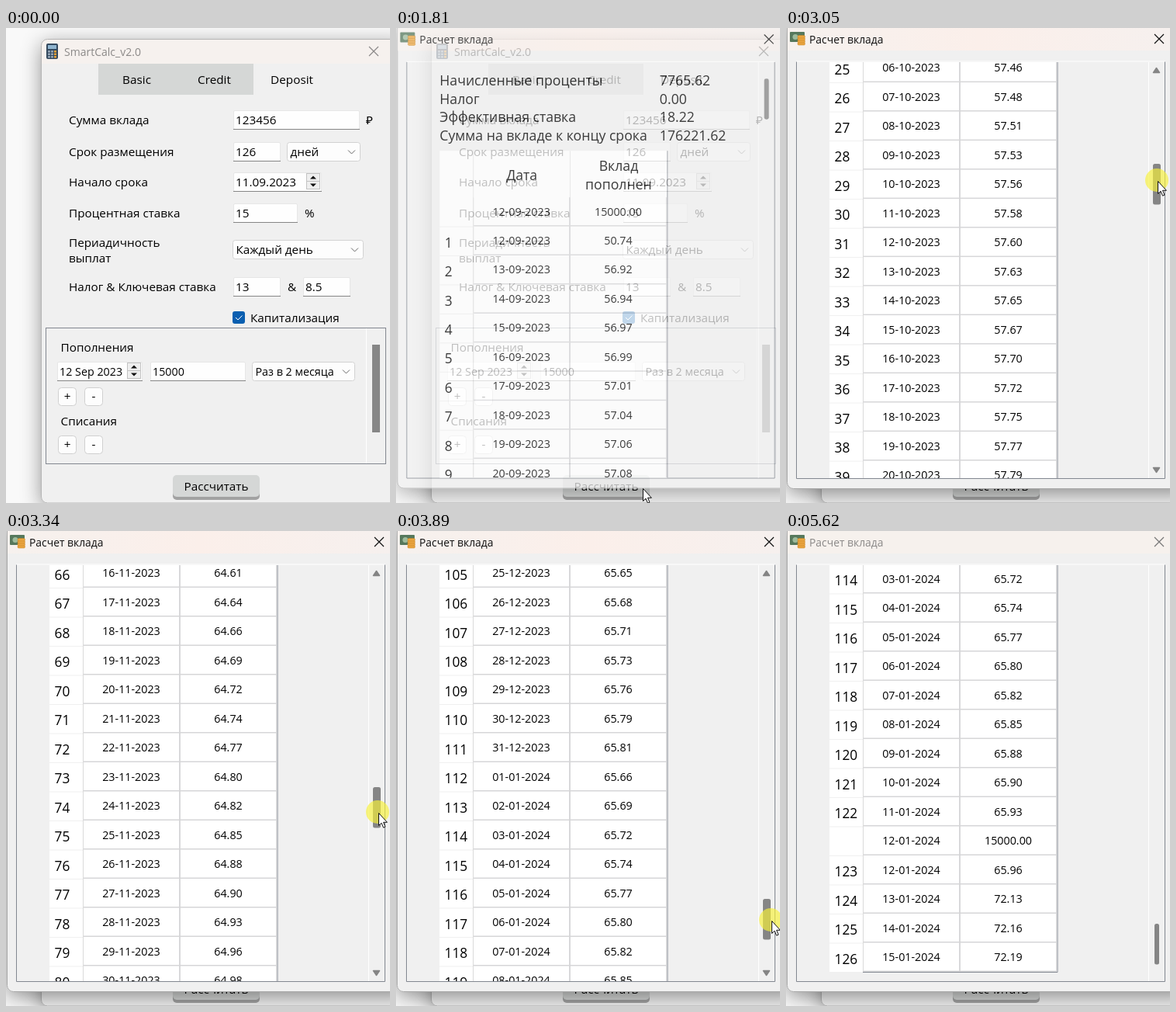
Recreate the animation shown at these times as an HTML page. Size 495x612 px, loop 5.69 s.

```html
<!DOCTYPE html>
<html lang="ru">
<head>
<meta charset="utf-8">
<title>SmartCalc</title>
<style>
html, body { margin: 0; width: 100%; height: 100%; overflow: hidden; background: #f9f9f9; }
svg { display: block; font-family: "Open Sans", "Noto Sans", sans-serif; font-size: 15.3px; }
text { white-space: pre; }
</style>
</head>
<body>
<svg id="stage" width="495" height="612" viewBox="0 0 495 612">
  <defs>
    <filter id="shadow" x="-20%" y="-20%" width="140%" height="140%">
      <feDropShadow dx="0" dy="6" stdDeviation="13" flood-color="#000" flood-opacity=".42"/>
    </filter>
    <linearGradient id="warm">
      <stop offset="0" stop-color="#f6f1ee"/><stop offset=".5" stop-color="#fbefea"/><stop offset="1" stop-color="#f6f0ee"/>
    </linearGradient>
    <linearGradient id="hover" x2="0" y2="1">
      <stop offset="0" stop-color="#9ab0cd"/><stop offset="1" stop-color="#dfe6ee"/>
    </linearGradient>
    <clipPath id="view"><rect x="14" y="44" width="453" height="536"/></clipPath>
  </defs>
</svg>
<script>
const LOOP = 5690, ROW = 37.5, SCROLL_MAX = 4487.5;
const stage = document.getElementById('stage');

function set(node, attrs) {
  for (const k in attrs) node.setAttribute(k, attrs[k]);
  return node;
}
function el(tag, attrs, parent) {
  return parent.appendChild(set(document.createElementNS('http://www.w3.org/2000/svg', tag), attrs));
}
const group = (parent, attrs = {}) => el('g', attrs, parent);
const rect = (p, x, y, width, height, fill, more = {}) => el('rect', { x, y, width, height, fill, ...more }, p);
const path = (p, d, more = {}) => el('path', { d, fill: 'none', ...more }, p);
function text(p, x, y, str, more = {}) {
  const t = el('text', { x, y, ...more }, p);
  t.textContent = str;
  return t;
}
const mid = { 'text-anchor': 'middle' };
const small = { 'font-size': 14.3 };

function box(p, x, y, w, h) {
  rect(p, x + .5, y + .5, w - 1, h - 1, '#fefefe', { rx: 1.5, stroke: '#e6e6e6' });
}
function field(p, x, y, w, str, more) {
  box(p, x, y, w, 25);
  rect(p, x, y + 24, w, 1, '#868686');
  text(p, x + 3, y + 18, str, more);
}
function combo(p, x, y, w, str, more) {
  rect(p, x + .5, y + .5, w - 1, 24, '#fdfdfd', { rx: 3, stroke: '#d2d2d2' });
  text(p, x + 4.5, y + 18, str, more);
  path(p, `M${x + w - 16} ${y + 10.5}l4.5 4.5 4.5-4.5`, { stroke: '#666' });
}
function spin(p, x, y, w, str, more) {
  field(p, x, y, w, str, more);
  const left = x + w - 19.5;
  for (const [dy, d] of [[1.5, 'l4-4 4 4z'], [11.5, 'l4 4 4-4z']]) {
    rect(p, left, y + dy, 17, 10, '#efefef', { stroke: '#c2c2c2' });
    path(p, `M${left + 4.5} ${y + dy + (dy < 5 ? 7 : 3)}${d}`, { fill: '#111' });
  }
}
function push(p, x, y, str) {
  rect(p, x + .5, y + .5, 23, 23, '#fdfdfd', { rx: 4, stroke: '#d0d0d0' });
  text(p, x + 12, y + 17, str, mid);
}
const cross = (p, x, y) => path(p, `M${x - 6} ${y - 6}l12 12m0-12l-12 12`, { stroke: '#111', 'stroke-width': 1.2 });

// Calculator window
const main = group(stage);
rect(main, 45.5, 14.5, 470, 597.5, '#f0f0f0', { rx: 8, filter: 'url(#shadow)' });
const mainBar = path(main, 'M45.5 46V22.5a8 8 0 0 1 8-8H500V46z');
rect(main, 45.5, 14.5, 470, 597.5, 'none', { rx: 8, stroke: '#b5b5b5' });
rect(main, 52, 20, 15, 20, '#34495e', { rx: 2 });
rect(main, 54, 22, 11, 5, '#8fb4cf');
for (let i = 0; i < 9; i++)
  rect(main, 54 + i % 3 * 4, 29 + (i / 3 | 0) * 3.5, 3, 2.5, i % 3 === 2 ? '#e9a23b' : '#93a4b5');
const mainTitle = text(main, 75, 36, 'SmartCalc_v2.0', { 'font-size': 14 });
const mainClose = cross(main, 474, 30);

rect(main, 119, 46, 200, 40, '#d5d7d6');
['Basic', 'Credit', 'Deposit'].forEach((s, i) => text(main, 168.5 + i * 100, 72, s, mid));

[[124, 'Сумма вклада'], [165, 'Срок размещения'], [204, 'Начало срока'], [244, 'Процентная ставка'],
 [282, 'Периадичность'], [302, 'выплат'], [339, 'Налог & Ключевая ставка']]
  .forEach(([y, s]) => text(main, 81, y, s));
field(main, 293, 106, 163, '123456');
text(main, 464, 124, '₽');
field(main, 293, 147, 61, '126');
combo(main, 362, 147, 95, 'дней');
spin(main, 293, 186, 114, '11.09.2023');
field(main, 293, 226, 83, '15');
text(main, 385, 244, '%');
combo(main, 292, 273, 169, 'Каждый день');
field(main, 293, 321, 61, '13');
text(main, 363, 339, '&');
field(main, 383, 321, 61, '8.5');
rect(main, 292, 365, 16, 16, '#0a5fb0', { rx: 3 });
path(main, 'M296 373l3 3 5.5-5.5', { stroke: '#fff' });
text(main, 315, 379, 'Капитализация');

rect(main, 51.5, 386.5, 438, 175, '#f0f0f0', { stroke: '#828790' });
rect(main, 464, 387, 1, 174, '#fff');
rect(main, 472, 408, 10, 113, '#868686');
text(main, 70.5, 417, 'Пополнения');
spin(main, 66, 430, 110, '12 Sep 2023', small);
field(main, 186, 430, 123, '15000', small);
combo(main, 317, 430, 133, 'Раз в 2 месяца', small);
text(main, 70.5, 512, 'Списания');
for (const y of [463, 525]) {
  push(main, 67, y, '+');
  push(main, 101, y, '-');
}
const calcEdge = rect(main, 215, 580, 112, 28, '', { rx: 5 });
const calcFace = rect(main, 215, 576, 112, 28, '', { rx: 5 });
text(main, 271, 596, 'Рассчитать', mid);

// Result window
const dialog = group(stage);
rect(dialog, 1.5, -10, 520, 603.5, '#f0f0f0', { rx: 8, stroke: '#a9a9a9', filter: 'url(#shadow)' });
const dialogBar = rect(dialog, 2, 0, 493, 29, '');
rect(dialog, 5, 5, 19, 13, '#56785c', { rx: 1 });
el('circle', { cx: 12, cy: 11.5, r: 3.5, fill: '#9dbb9c' }, dialog);
for (let i = 0; i < 4; i++)
  rect(dialog, 15, 18.5 - i * 3, 9.5, 3.5, '#e9a440', { rx: 1.5, stroke: '#c98422', 'stroke-width': .5 });
const dialogTitle = text(dialog, 30, 20, 'Расчет вклада', { 'font-size': 13.9 });
const dialogClose = cross(dialog, 481, 14);
path(dialog, 'M13.5 43V580.5H488.5V43', { stroke: '#828790' });
rect(dialog, 13, 42.5, 476, 1, '#fff');
rect(dialog, 467, 44, 1, 536, '#fff');

const sheet = group(group(dialog, { 'clip-path': 'url(#view)' }));
const big = { 'font-size': 17.7 };
[['Начисленные проценты', '7765.62'], ['Налог', '0.00'], ['Эффективная ставка', '18.22'],
 ['Сумма на вкладе к концу срока', '176221.62']].forEach(([name, value], i) => {
  const y = 74 + i * 23.6;
  text(sheet, 56, y, name, big);
  text(sheet, 340, y, value, big);
});
const tableEnd = 218 + 129 * ROW;
rect(sheet, 56, 158, 294, tableEnd - 158, '#fff');
text(sheet, 162, 196, 'Дата', { ...mid, ...big });
text(sheet, 287, 184, 'Вклад', { ...mid, ...big });
text(sheet, 287, 208, 'пополнен', { ...mid, ...big });
rect(sheet, 99, 158, 1, 60, '#e6e6e6');
rect(sheet, 224, 158, 1, 60, '#e6e6e6');
rect(sheet, 99, 218, 1, tableEnd - 218, '#dadada');
rect(sheet, 223, 218, 2, tableEnd - 218, '#d8d8da');
rect(sheet, 348, 218, 1, tableEnd - 218, '#dadada');
path(sheet, `M350 158V${tableEnd + .5}H56`, { stroke: '#868b94' });

let line = 0;
function addRow(num, date, value) {
  const y = 236.5 + line++ * ROW;
  rect(sheet, 100, y + 17.5, 249, 1.5, '#d6d6d8');
  rect(sheet, 56, y + 19, 43, 1, '#f0f0f0');
  text(sheet, 62.5, y + 8.7, num, { 'font-size': 17.3 });
  text(sheet, 161.5, y + 5, date, { ...mid, ...small });
  text(sheet, 286.5, y + 5, value.toFixed(2), { ...mid, ...small });
}
// Daily capitalisation at 15 %, topped up on the 12th of every second month
let sum = 123456;
for (let n = 1; n <= 126; n++) {
  const day = new Date(Date.UTC(2023, 8, 11 + n));
  const date = day.toISOString().slice(0, 10).split('-').reverse().join('-');
  const gain = sum * .15 / (day.getUTCFullYear() === 2024 ? 366 : 365);
  sum += gain;
  if (day.getUTCDate() === 12 && day.getUTCMonth() % 2 === 0) {
    addRow('', date, 15000);
    sum += 15000;
  }
  addRow(n, date, gain);
}

const arrows = group(dialog);
for (const d of ['M473.5 57.5l4-6 4 6z', 'M473.5 566.5l4 6 4-6z'])
  path(arrows, d, { fill: '#858585', stroke: '#858585', 'stroke-width': 1.5, 'stroke-linejoin': 'round' });
const thumb = rect(dialog, 473, 65, 10, 52.5, '#858585', { rx: 2.5 });

// Pointer
const pointer = group(stage);
const halo = el('circle', { cx: -1, cy: -1, r: 15, fill: '#f8f13a', 'fill-opacity': .66 }, pointer);
path(pointer, 'M.5 .5V16.5L4 13.2L6.6 19.2L9 18.1L6.5 12.3H11.4Z', { fill: '#fff', stroke: '#111' });

const starts = [0, 1550, 1600, 2150, 2780, 3410, 3890, 4030, 4660];
const way = [[0, 268, 640], [70, 268, 622], [550, 264, 592], [1670, 264, 592], [2080, 423, 594], [2150, 430, 575],
  [2500, 470, 240], [2710, 478, 94], [2780, 478, 98], [3340, 480, 363], [3890, 484, 502], [3960, 484, 514],
  [4240, 483, 540], [4450, 482, 557], [4590, 482, 575], [4990, 478, 640]];
const drag = [[2740, 0], [3340, 2695], [3890, 4157.5], [3960, 4280], [4240, SCROLL_MAX]];

// Linear value of one column of a time-sorted key list
function at(keys, t, col = 1) {
  const i = keys.findIndex(k => k[0] > t);
  if (i < 0) return keys[keys.length - 1][col];
  if (i === 0) return keys[0][col];
  const a = keys[i - 1], b = keys[i];
  return a[col] + (b[col] - a[col]) * (t - a[0]) / (b[0] - a[0]);
}
function stepped(t) {
  const s = starts.filter(v => v <= t).pop();
  return s + Math.floor((t - s) / 70) * 70;
}

function draw(now) {
  const real = now % LOOP, t = stepped(real);
  const x = Math.round(at(way, t, 1)), y = Math.round(at(way, t, 2));
  const active = real >= 70, open = at([[1600, 0], [1880, 1]], t);

  set(mainBar, { fill: active ? '#f3f3f1' : '#f6f1ee' });
  set(mainTitle, { fill: active ? '#111' : '#8b8988' });
  set(mainClose, { stroke: active ? '#111' : '#8b8988' });
  const hot = y < 608 && t < 1740;
  set(calcFace, { fill: hot ? 'url(#hover)' : '#d5d7d6' });
  set(calcEdge, { fill: hot ? '#94abc8' : '#a2a2a2' });

  const ease = 1 - (1 - open) ** 3, k = .9 + .1 * ease;
  set(dialog, {
    opacity: open,
    visibility: open ? 'visible' : 'hidden',
    transform: `translate(${250 * (1 - k)} ${297 * (1 - k)}) scale(${k})`
  });
  const focus = real < 5620;
  set(dialogBar, { fill: focus ? 'url(#warm)' : '#f6f1ed' });
  set(dialogTitle, { fill: focus ? '#111' : '#8b8988' });
  set(dialogClose, { stroke: focus ? '#111' : '#777' });

  const scroll = at(drag, t);
  set(sheet, { transform: `translate(0 ${-scroll})` });
  const wide = t >= 2500 && real < 5130 ? 1 : real >= 5130 && real < 5270 ? .5 : 0;
  set(arrows, { opacity: wide });
  set(thumb, { x: 475 - 2 * wide, width: 6 + 4 * wide, y: Math.round(65 + scroll * 441 / SCROLL_MAX) });

  const down = t >= 1550 && t < 1670 || t >= 2780 && t < 4660;
  set(pointer, { transform: `translate(${x} ${y})` });
  set(halo, { visibility: down ? 'visible' : 'hidden' });
}

function frame() {
  draw(performance.now());
  requestAnimationFrame(frame);
}
frame();
</script>
</body>
</html>
```
